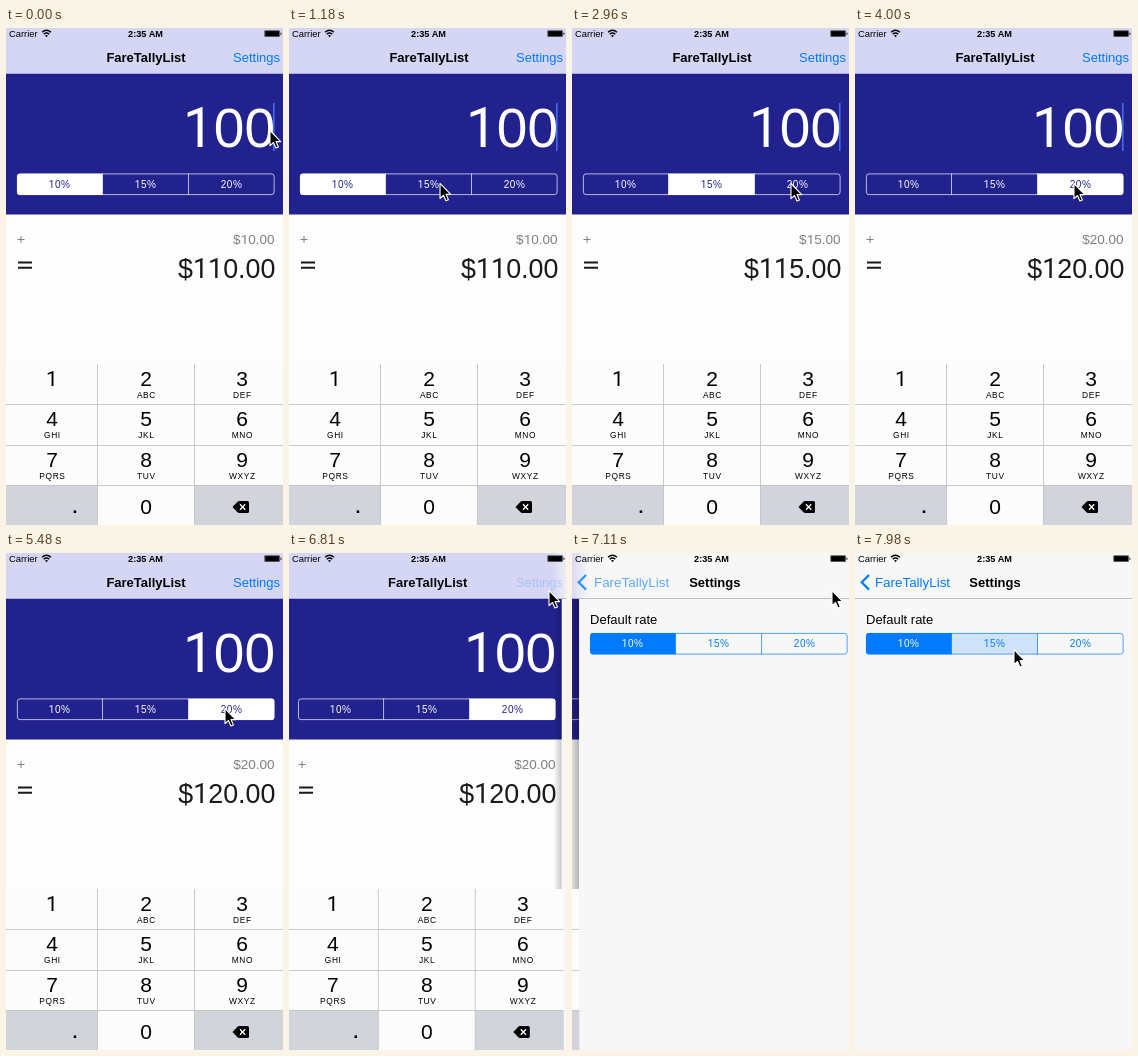
An HTML page that plays this animation: 277x497 px, repeating every 8 s.

```html
<!DOCTYPE html>
<html lang="en">
<head>
<meta charset="utf-8">
<title>Tip screen</title>
<style>
  html, body { margin: 0; width: 100%; height: 100%; overflow: hidden; background: #fdfdfd; }
  svg { display: block; width: 100%; height: 100%; }
  text { font-family: "Liberation Sans", Arial, sans-serif; }
  .one { font-family: Roboto, sans-serif; }
  .bold { font-weight: 700; }
  .seg { letter-spacing: .6px; }
  .sub { letter-spacing: .6px; }
</style>
</head>
<body>
<svg id="stage" viewBox="0 0 277 497" preserveAspectRatio="none"></svg>
<script>
const LOOP = 8000, TICK = 147.65, LEAD = 6;
const W = 277, NAV = 45.75, NAVY = '#22228f', BLUE = '#007aff', LAVENDER = '#d5d5f4', PAPER = '#f7f7f7';
const APP = 'FareTallyList';
const RATES = [10, 15, 20];

// The digit 1 is set in a face that draws it without a foot.
const footless = str => String(str).replace(/1/g, '<tspan class="one">1</tspan>');

// Text placed by the middle of its capitals.
const label = (x, cy, size, str, { anchor = 'middle', cls = '', fill = '#000', id = '' } = {}) =>
  `<text id="${id}" x="${x}" y="${cy + size * .35}" font-size="${size}" text-anchor="${anchor}" class="${cls}" fill="${fill}">${footless(str)}</text>`;
const box = (x, y, w, h, fill, more = '') =>
  `<rect x="${x}" y="${y}" width="${w}" height="${h}" fill="${fill}" ${more}/>`;

const segments = (id, top, tint) => {
  const edges = [11, 96.5, 182.5, 268.5];
  const cells = RATES.map((rate, i) =>
    box(edges[i], top, edges[i + 1] - edges[i], 21.5, tint, `id="${id}Fill${i}"`)).join('');
  const names = RATES.map((rate, i) =>
    label([53.6, 139.6, 225.6][i], top + 10.8, 10, rate + '%', { cls: 'seg', id: `${id}Text${i}` })).join('');
  return `<clipPath id="${id}Clip">${box(11, top, 257.5, 21.5, '#000', 'rx="3"')}</clipPath>
    <g clip-path="url(#${id}Clip)">${cells}</g>
    <g stroke="${tint}" stroke-width=".75" stroke-opacity=".9">
      ${box(11.4, top + .4, 256.7, 20.7, 'none', 'rx="2.6"')}
      <path d="M96.5 ${top}v21.5M182.5 ${top}v21.5"/>
    </g>${names}`;
};

const keypad = () => {
  const cols = [46, 140, 236], tops = [336, 376.5, 417.5];
  const letters = ['', 'ABC', 'DEF', 'GHI', 'JKL', 'MNO', 'PQRS', 'TUV', 'WXYZ'];
  const keys = letters.map((sub, i) => {
    const x = cols[i % 3], y = tops[i / 3 | 0];
    return label(x, y + 14.6, 21, i + 1) + label(x + .4, y + 31, 8.4, sub, { cls: 'sub' });
  }).join('');
  return box(0, 336, W, 161, '#fcfcfc') +
    box(0, 457.5, 91.5, 40, '#d1d5db') + box(188.5, 457.5, 88.5, 40, '#d1d5db') +
    `<path d="M0 376.5H277M0 417.5H277M0 457.5H277M91.5 336V497M188.5 336V497" stroke="#c2c4c7" stroke-width=".9" fill="none"/>` +
    keys + label(140, 478.3, 21, 0) + box(67.7, 482.4, 2.5, 2.6, '#000') +
    `<path d="M226.5 479l5-5.3q.7-.7 1.6-.7H241.500q1.500 0 1.500 1.500v9q0 1.500-1.500 1.500H233.100q-.9 0-1.600-.7z"/>
     <path d="M234 476.300l5.200 5.400m0-5.400l-5.200 5.400" stroke="#fff" stroke-width="1.300"/>`;
};

const statusBar = () =>
  label(3, 5.6, 9.4, 'Carrier', { anchor: 'start' }) +
  label(139.5, 5.6, 9.2, '2:35 AM', { cls: 'bold' }) +
  `<g fill="none" stroke="#000" stroke-width="1.3"><path d="M36 4.300q4.500-4 9 0M37.700 6.200q2.800-2.500 5.600 0"/></g>
   <path d="M40.500 9.300l-1.500-1.700q1.500-1 3 0z"/>` +
  box(258.3, 2.3, 15.6, 6.6, '#555', 'rx="1"') + box(259.3, 3.2, 13.6, 4.8, '#000') +
  box(274.3, 4.4, 1.2, 2.5, '#333', 'rx=".6"');

const stage = document.getElementById('stage');
stage.innerHTML = `
  <defs>
    <linearGradient id="shade"><stop stop-opacity="0"/><stop offset="1" stop-opacity=".22"/></linearGradient>
    <linearGradient id="navTint" gradientUnits="userSpaceOnUse" x1="0" x2="1" y1="0" y2="0">
      <stop stop-color="${LAVENDER}"/><stop offset="1" stop-color="${PAPER}"/></linearGradient>
  </defs>
  ${box(0, 0, W, 497, '#fdfdfd')}
  <g id="main">
    ${box(0, 45, W, 141.5, NAVY)}
    ${label(269, 99.5, 55, 100, { anchor: 'end', fill: '#fff' })}
    ${box(267, 75, 1.6, 48, '#426bf2', 'id="caret"')}
    ${segments('tip', 145.5, '#fff')}
    <path d="M11.500 211.500h7M15 208v7" stroke="#808080"/>
    <path d="M12 234.500h14M12 239.800h14" stroke="#1a1a1a" stroke-width="1.900"/>
    ${label(268.5, 211, 13.5, '', { anchor: 'end', fill: '#808080', id: 'tipSum' })}
    ${label(269.3, 241, 26.8, '', { anchor: 'end', fill: '#1a1a1a', id: 'total' })}
  </g>
  ${box(0, 45, W, 452, '#000', 'id="dim"')}
  <g id="page">
    ${box(-8, 45, 8, 452, 'url(#shade)', 'id="pageShade"')}
    ${box(0, 45, W, 452, PAPER)}
    ${label(11, 66.5, 13, 'Default rate', { anchor: 'start' })}
    ${segments('set', 80, BLUE)}
  </g>
  <g id="keys">${keypad()}</g>
  ${box(0, 0, W, NAV, 'url(#navTint)')}
  ${box(0, 45, W, .8, '#b2b2b2', 'id="hairline"')}
  ${label(140, 29.5, 13, APP, { cls: 'bold', id: 'oldTitle' })}
  ${label(274, 29.5, 13, 'Settings', { anchor: 'end', fill: BLUE, id: 'button' })}
  ${label(140, 29.5, 13, 'Settings', { cls: 'bold', id: 'newTitle' })}
  ${label(57.5, 29.5, 13.4, APP, { fill: BLUE, id: 'back' })}
  <path id="chevron" d="M14 22l-7.300 7.300 7.300 7.300" fill="none" stroke="${BLUE}" stroke-width="2.200"/>
  ${statusBar()}
  <path id="cursor" d="M0 0V15.200L3.500 12L5.900 17.500L8.400 16.400L6 11.100H10.700z" stroke="#fff" stroke-width="1.100" stroke-linejoin="round"/>`;

const el = {};
stage.querySelectorAll('[id]').forEach(node => el[node.id] = node);
const shift = (node, x, y = 0) => node.setAttribute('transform', `translate(${x} ${y})`);
const fade = (node, a) => node.setAttribute('opacity', Math.min(1, Math.max(0, a)));

function paintSegments(id, selected, pressed, tint, ground) {
  RATES.forEach((rate, i) => {
    fade(el[id + 'Fill' + i], i === selected ? 1 : i === pressed ? .17 : 0);
    el[id + 'Text' + i].setAttribute('fill', i === selected ? ground : tint);
  });
}

// Pointer stops: tick, x, y.
const STOPS = [[2, 264, 102.5], [8, 142, 159.5], [16, 142, 159.5], [20, 219, 155.5],
  [38, 219, 155.5], [44, 260, 37.5], [48, 260, 37.5], [53, 159, 96.5]];

function pointer(tick) {
  const next = STOPS.findIndex(stop => stop[0] >= tick);
  if (next === 0) return STOPS[0].slice(1);
  if (next < 0) return STOPS[STOPS.length - 1].slice(1);
  const [t0, x0, y0] = STOPS[next - 1], [t1, x1, y1] = STOPS[next];
  const u = (tick - t0) / (t1 - t0), e = u * u * (3 - 2 * u);
  return [x0 + (x1 - x0) * e, y0 + (y1 - y0) * e];
}

function caretAlpha(ms) {
  const p = ms % 1000;
  return p < 460 ? (460 - p) / 95 : (p - 760) / 195;
}

// Critically damped slide, from 0 to 1.
function spring(ms) {
  const k = Math.max(0, ms) * .01816;
  return 1 - (1 + k) * Math.exp(-k);
}

function draw(time) {
  const tick = Math.max(0, Math.floor((time - LEAD) / TICK));
  const pushing = tick >= 46, settled = tick >= 50;
  const since = pushing ? (tick - 46) * TICK + 10.3 : 0;
  const p = settled ? 1 : spring(since);
  const x = W * (1 - p);

  shift(el.cursor, ...pointer(tick));
  fade(el.caret, pushing ? 0 : caretAlpha(tick * TICK));

  const choice = tick < 12 ? 0 : tick < 25 ? 1 : 2;
  const pressed = tick === 11 ? 1 : tick === 24 ? 2 : -1;
  paintSegments('tip', choice, pressed, '#fff', NAVY);
  paintSegments('set', 0, tick >= 54 ? 1 : -1, BLUE, '#fff');
  el.tipSum.innerHTML = footless(`$${RATES[choice]}.00`);
  el.total.innerHTML = footless(`$${100 + RATES[choice]}.00`);

  shift(el.main, -.45 * W * p);
  shift(el.page, x);
  shift(el.hairline, x);
  shift(el.keys, -W * (settled ? 1 : spring(since - 3)));
  fade(el.dim, .1 * p);
  fade(el.pageShade, pushing ? 1 : 0);
  const blur = pushing ? 10 * Math.min(1, x / 6) : 0;
  el.navTint.setAttribute('x1', x - blur);
  el.navTint.setAttribute('x2', x + blur + .01);

  shift(el.oldTitle, -82 * p);
  fade(el.oldTitle, 1 - since / 250);
  shift(el.back, 82 * (1 - p));
  fade(el.back, (since - 20) / 460);
  fade(el.chevron, (since - 20) / 360);
  shift(el.newTitle, 110 * (1 - p));
  fade(el.newTitle, (since - 20) / 230);
  fade(el.button, pushing ? .22 * (1 - since / 250) : 1);
}

function play() {
  draw(performance.now() % LOOP);
  requestAnimationFrame(play);
}
play();
</script>
</body>
</html>
```
